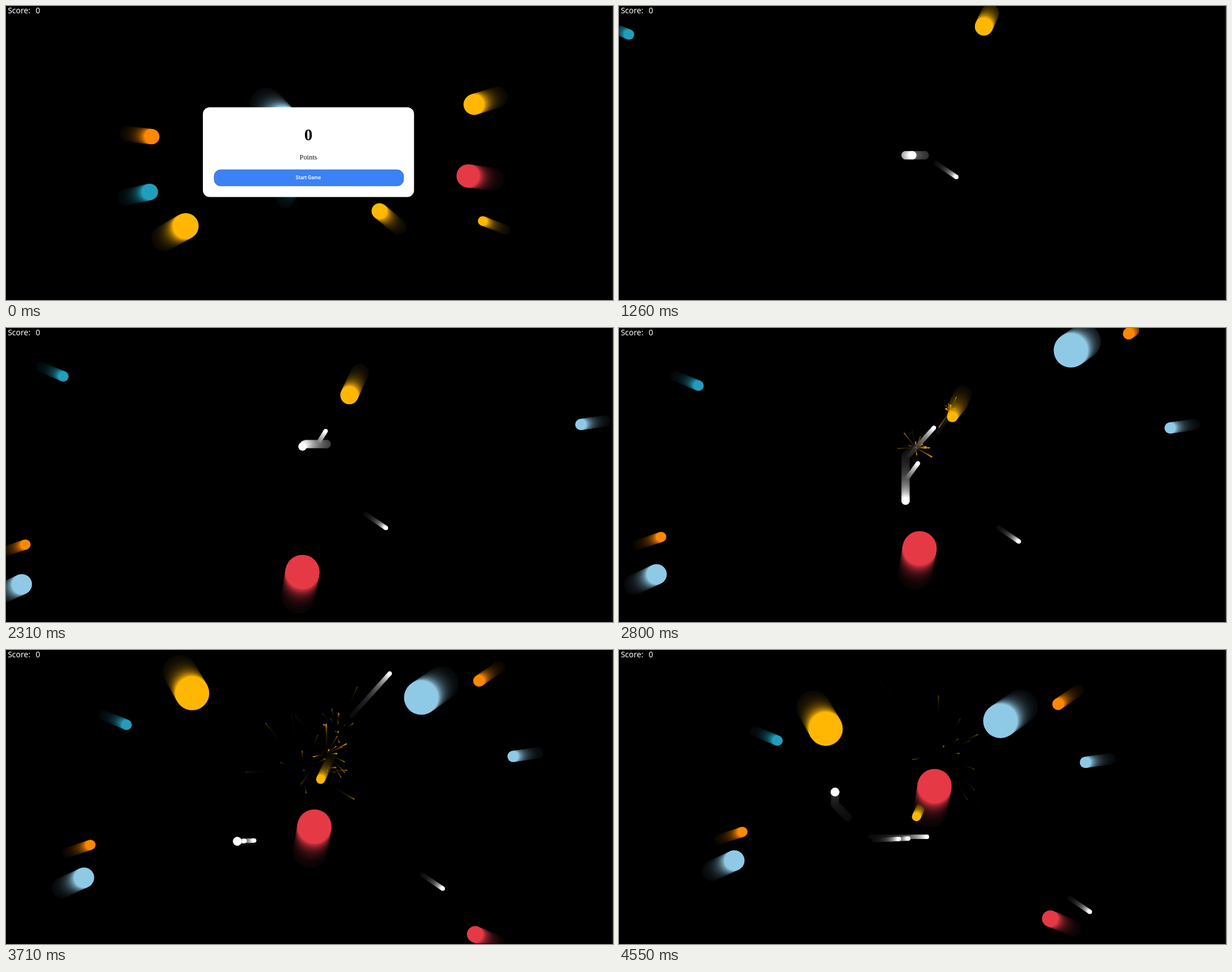
Write an HTML page with a canvas that moves like this. It is 1076 by 521 pixels and loops after 4620 ms.

```html
<!DOCTYPE html>
<html lang="en">
<head>
<meta charset="utf-8">
<title>Arcade loop</title>
<style>
  html, body { margin: 0; width: 100%; height: 100%; overflow: hidden; background: #000; }
  canvas, svg { position: absolute; left: 0; top: 0; width: 1076px; height: 521px; display: block; }
  canvas { filter: blur(.35px); }
  .score { font: 14px "Noto Sans", "Open Sans", sans-serif; fill: #fff; }
  .points { font: bold 29px "Liberation Serif", serif; }
  .label { font: 12.3px "Liberation Serif", serif; fill: #111; }
  .start { font: 600 8.3px Inter, sans-serif; fill: #fff; }
</style>
</head>
<body>
<canvas id="game" width="1076" height="521"></canvas>
<svg viewBox="0 0 1076 521">
  <rect x="1074" width="2" height="521" fill="#171715"/>
  <rect y="520" width="1076" height="1" fill="#120006"/>
  <text class="score" x="3.2" y="13">Score:</text>
  <text class="score" x="52.4" y="13">0</text>
  <g id="modal" text-anchor="middle">
    <rect x="349" y="179.5" width="374.3" height="159" rx="12" fill="#fff"/>
    <text class="points" x="536" y="238">0</text>
    <text class="label" x="536" y="271.6">Points</text>
    <rect x="369" y="290.2" width="335.8" height="28.6" rx="11.5" fill="#3b82f6" stroke="#3f66a8" stroke-width=".9"/>
    <text class="start" x="536" y="307">Start Game</text>
  </g>
</svg>
<script>
const LOOP = 4620, TICK = 70, START = 560, END = 4550;
const STEP = 1000 / 60, TRAIL = 30;
const WALK = 0.196, CHASE = 0.0867, SLOW = 0.087, FAST = 0.2;
const BLUE = '#8ecae6', TEAL = '#219ebc', YELLOW = '#ffb703', ORANGE = '#ff8800', RED = '#e63946';
const ctx = document.getElementById('game').getContext('2d');
const modal = document.getElementById('modal');
const clamp = (v, lo, hi) => Math.min(hi, Math.max(lo, v));

// Key presses: time, how long, directions
const presses = [
  [1000, 170, 'L'], [1200, 305, 'R'], [1500, 300, 'U'], [2094, 194, 'L'],
  [2288, 112, 'LD'], [2400, 415, 'D'], [2860, 92, 'L'], [2952, 153, 'LD'],
  [3105, 255, 'L'], [3830, 195, 'U'], [4025, 138, 'LU'], [4163, 112, 'U']
];

function playerAt(t) {
  let x = 541.5, y = 264.5;
  for (const [from, ms, keys] of presses) {
    const d = WALK * clamp(t - from, 0, ms);
    const has = key => keys.includes(key);
    x += d * (has('R') - has('L'));
    y += d * (has('D') - has('U'));
  }
  return [x, y];
}

// Velocity from one point towards another
function aim([x0, y0], [x1, y1], speed) {
  const k = speed / Math.hypot(x1 - x0, y1 - y0);
  return [(x1 - x0) * k, (y1 - y0) * k];
}

// A foe is at x, y at the time ref and heads for where the player was when it spawned
function foe(ref, x, y, r, color, spawn = 0) {
  const [vx, vy] = aim([x, y], playerAt(spawn), CHASE);
  // Chasers that already passed the spot keep their course
  return { ref, x, y, r, color, spawn, vx, vy };
}

const oldFoes = [
  [258.5, 231.5, 13.5, ORANGE], [255, 329.5, 14.5, TEAL], [318.5, 390, 23, YELLOW],
  [491, 208, 30.5, BLUE], [517, 305.5, 16, TEAL], [545.5, 282.5, 11, BLUE],
  [662, 363.5, 14, YELLOW], [845, 381, 8.5, YELLOW], [819, 301, 20.5, RED],
  [829.5, 174.5, 18.5, YELLOW]
].map(f => foe(START, ...f));

const foes = [
  [629, 75, 16, YELLOW, 960], [57, 67, 9.2, TEAL, 1060], [517, 480, 30.3, RED, 1440],
  [1067, 164, 10, BLUE, 1640], [-11.5, 399, 9, ORANGE, 1810], [-16, 474.5, 18, BLUE, 1810],
  [876, -12, 30.5, BLUE, 2470], [978.5, -41.5, 10.3, ORANGE, 2675],
  [245, -70.5, 30.2, YELLOW, 3035], [988.5, 569, 14.5, RED, 3235]
].map(f => foe(1750, ...f));

// Shots: fired at, aimed at x, y, speed, whether they hit there
const shots = [
  [475, 834, 463.5, SLOW], [2174, 588, 148, FAST, true], [2425, 633, 94, FAST],
  [2615, 570, 185, FAST, true], [3367, 514, 334, SLOW], [3560, 514, 334, SLOW],
  [3870, 547, 331, FAST]
].map(([at, tx, ty, speed, hits]) => {
  const [x, y] = playerAt(at), [vx, vy] = aim([x, y], [tx, ty], speed);
  const end = hits ? at + Math.hypot(tx - x, ty - y) / speed : LOOP;
  return { at, x, y, vx, vy, end };
});
const HIT = shots[1].end;

function random(seed) {
  return () => (seed = seed * 16807 % 2147483647) / 2147483647;
}

// Most sparks stay near the centre, a few fly far
function burst(at, x, y, seed) {
  const rnd = random(seed);
  const speed = () => (rnd() - 0.5) * rnd() * 5.4;
  const sparks = Array.from({ length: 15 }, () => ({ vx: speed(), vy: speed(), r: 0.35 + rnd() }));
  return { at, x, y, sparks };
}
const bursts = [
  burst(HIT, 526, 212, 7411), burst(HIT, 587, 148, 52361), burst(shots[3].end, 569, 184, 90127)
];

function disc(x, y, r, color) {
  ctx.fillStyle = color;
  ctx.beginPath();
  ctx.arc(x, y, r, 0, Math.PI * 2);
  ctx.fill();
}

function drawSparks(t) {
  for (const b of bursts) {
    const n = (t - b.at) / STEP;
    if (n < 0 || n >= 100) continue;
    const d = (1 - 0.99 ** n) / 0.01;
    ctx.globalAlpha = 1 - n / 100;
    for (const s of b.sparks) disc(b.x + s.vx * d, b.y + s.vy * d, s.r, YELLOW);
  }
  ctx.globalAlpha = 1;
}

function drawShots(t) {
  for (const s of shots) {
    const dt = t - s.at;
    if (dt >= 0 && t < s.end) disc(s.x + s.vx * dt, s.y + s.vy * dt, 3.9, '#fff');
  }
}

function drawFoes(list, t) {
  for (const f of list) {
    if (t < f.spawn) continue;
    // The first foe shrinks after it is hit
    const left = 1 - clamp((t - HIT) / 500, 0, 1);
    const r = f === foes[0] ? f.r - 8 * (1 - left ** 2) : f.r;
    disc(f.x + f.vx * (t - f.ref), f.y + f.vy * (t - f.ref), r, f.color);
  }
}

function drawGame(t) {
  disc(...playerAt(t), 7.5, '#fff');
  drawSparks(t);
  drawShots(t);
  drawFoes(foes, t);
}

function render(t) {
  modal.style.display = t < START ? '' : 'none';
  const now = clamp(t, START, END);
  ctx.fillStyle = '#000';
  ctx.fillRect(0, 0, 1076, 521);
  // Each step dims the picture a little, which leaves the trails
  for (let n = TRAIL; n >= 0; n--) {
    const s = now - n * STEP;
    ctx.fillStyle = 'rgba(0,0,0,0.1)';
    ctx.fillRect(0, 0, 1076, 521);
    if (s <= START) drawFoes(oldFoes, s);
    else drawGame(s);
  }
}

const begin = performance.now();
let last = -1;
function loop() {
  const t = Math.floor((performance.now() - begin) % LOOP / TICK) * TICK;
  if (t !== last) render(last = t);
  requestAnimationFrame(loop);
}
loop();
</script>
</body>
</html>
```
